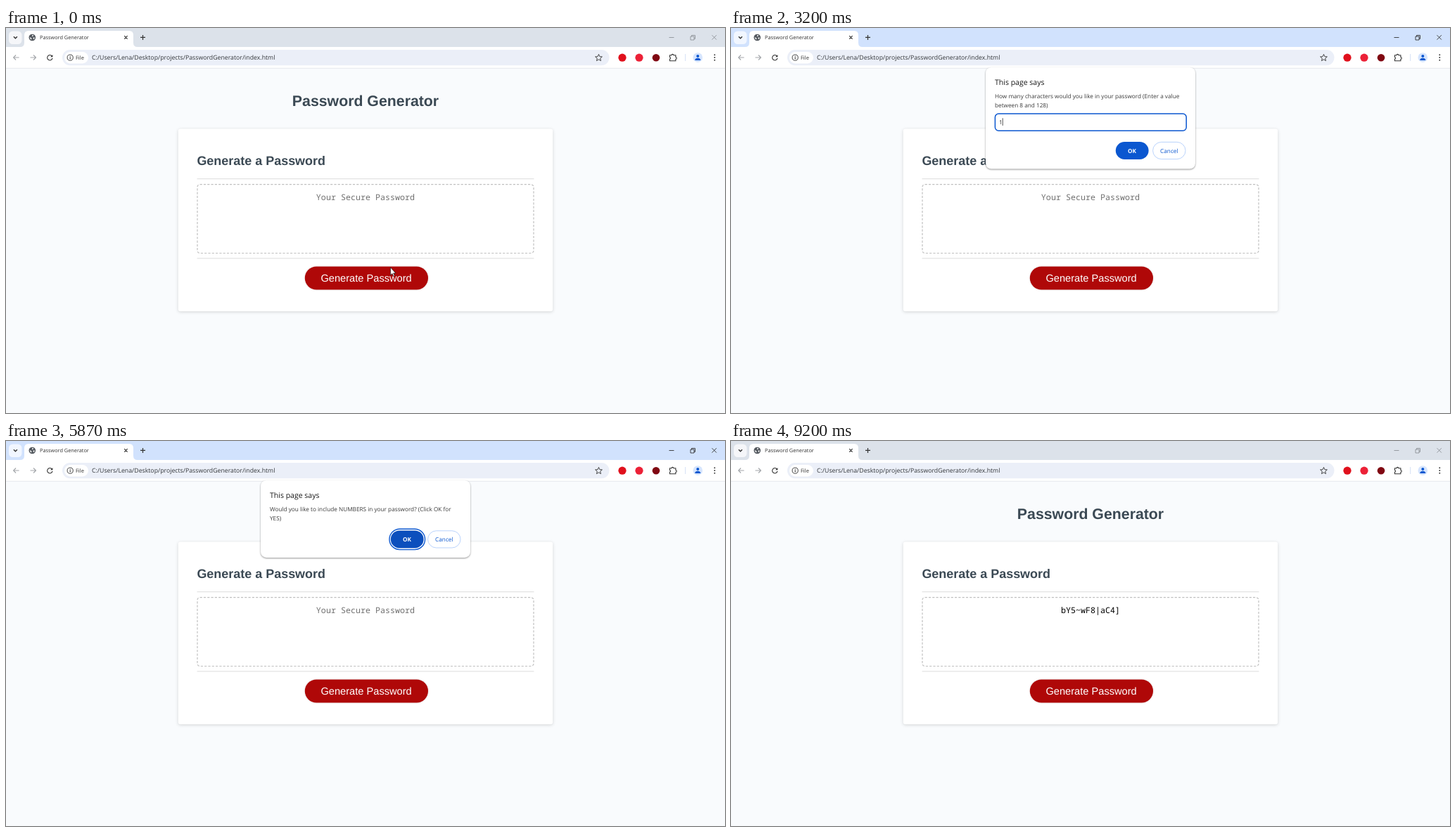
Recreate the animation shown at these times as an HTML page. Size 1022 by 548 pixels, loop 9400 ms.

```html
<!DOCTYPE html>
<html lang="en">
<head>
<meta charset="utf-8">
<title>Password Generator</title>
<style>
html, body { margin: 0; width: 100%; height: 100%; overflow: hidden; background: #f9fbfd; }
svg { display: block; width: 100vw; height: 100vh; }
text { font-family: "Open Sans", "Noto Sans", sans-serif; font-size: 8.22px; fill: #3a3a3a; text-rendering: geometricPrecision; white-space: pre; }
.page { font-family: "Liberation Sans", Arial, sans-serif; font-weight: 700; fill: #3b4954; }
.mono { font-family: "Noto Sans Mono", "DejaVu Sans Mono", monospace; font-size: 11.7px; }
.mid { text-anchor: middle; }
.line { fill: none; stroke: #333; stroke-width: 1.1; }
.card { filter: drop-shadow(0 1.3px 2px rgba(0,0,0,.16)); }
.button { filter: drop-shadow(0 .7px .8px rgba(0,0,0,.15)); }
.panel { filter: drop-shadow(0 1.1px 1.1px rgba(0,0,0,.42)); }
</style>
</head>
<body>
<svg viewBox="0 0 1022 548">
  <rect width="1022" height="548" fill="#f9fbfd"/>

  <!-- Page -->
  <text class="page mid" x="511" y="111" style="font-size:21.3px">Password Generator</text>
  <rect class="card" x="244.8" y="143.5" width="532.4" height="259.8" rx="3.3" fill="#fff"/>
  <text class="page" x="271.4" y="195" style="font-size:17.97px">Generate a Password</text>
  <path d="M271.5 214.7H750.5M271.5 327.9H750.5" stroke="#e3e3e3" stroke-width="1.3"/>
  <rect x="272" y="222.7" width="478" height="97.8" rx="3.6" fill="none" stroke="#c0c0c0" stroke-width="1.2" stroke-dasharray="3.2 2.1"/>
  <text id="field" class="mono mid" x="511" y="244.8"></text>
  <rect class="button" x="424.8" y="339.4" width="175.2" height="33.1" rx="16.5" fill="#af0808"/>
  <text class="page mid" x="512.1" y="360.7" style="font-size:14.64px;font-weight:400;fill:#fff">Generate Password</text>

  <!-- Browser -->
  <rect id="strip" width="1022" height="28"/>
  <rect x="4" y="4.5" width="18.5" height="18.5" rx="5.5" fill="#fff" opacity=".7"/>
  <path class="line" d="M10.9 12.3l2.5 2.5 2.5-2.5" style="stroke-width:1.4"/>
  <path d="M20 27q6 0 6-6V10q0-6 6-6H175q6 0 6 6v11q0 6 6 6z" fill="#fff"/>
  <circle cx="37.3" cy="13.5" r="4.8" fill="#555a60"/>
  <path d="M33.8 13l2.6 1.6-.3 2.1q-2.1-1-2.3-3.7zM37.4 10h1.6l-.4 1.4-1.8.8zM38.6 13.6h2.2l-.7 1.9-1.2.4z" fill="#fff"/>
  <text x="48" y="16.3" style="font-size:7.33px;fill:#333">Password Generator</text>
  <path class="line" d="M168.2 11.2l4.4 4.4m0-4.4l-4.4 4.4M191 13.4h7m-3.5-3.5v7" style="stroke-width:1.2"/>
  <path id="controls" class="line" d="M942.5 13.5h7M973 12h5v5h-5zM974.5 12v-1.6h5v5h-1.5M1003.5 10.2l6.4 6.4m0-6.4l-6.4 6.4" style="stroke-width:.9"/>
  <rect y="27" width="1022" height="30" fill="#fff"/>
  <path d="M0 57.3H1022" stroke="#e2e5e9" stroke-width=".8"/>
  <path class="line" d="M18.6 42h-8m3.5-3.5l-3.5 3.5 3.5 3.5M34.5 42h8m-3.5-3.5l3.5 3.5-3.5 3.5" style="stroke:#a3a6aa"/>
  <path class="line" d="M65.5 40.3a3.7 3.7 0 1 0 .5 2.6"/>
  <path d="M66.4 38v3.2h-3.2z" fill="#333"/>
  <rect x="80" y="31" width="777.5" height="22.2" rx="11.1" fill="#ebeff8"/>
  <rect x="83" y="34" width="34" height="16.4" rx="8.2" fill="#fff"/>
  <circle class="line" cx="91.2" cy="42.1" r="4.1" style="stroke-width:.9"/>
  <path class="line" d="M91.2 41.5v2.8M91.2 39.8v1"/>
  <text x="99" y="45" style="font-size:7.5px;fill:#333">File</text>
  <text x="122" y="45.4" style="font-size:8.74px;fill:#33363a">C:/Users/Lena/Desktop/projects/PasswordGenerator/index.html</text>
  <path class="line" d="M842.5 37.4l1.4 3.2 3.5.3-2.7 2.3.8 3.4-3-1.8-3 1.8.8-3.4-2.7-2.3 3.5-.3z" style="stroke-width:.9"/>
  <circle cx="876" cy="42.2" r="5.6" fill="#e0101c"/>
  <circle cx="900" cy="42.2" r="5.6" fill="#ec2137"/>
  <circle cx="924" cy="42.2" r="5.3" fill="#800712"/>
  <path class="line" d="M943.5 38.8h2.6a1.4 1.4 0 0 1 2.8 0h3v2.7a1.4 1.4 0 0 1 0 2.8v2.5h-8.4v-2.6a1.4 1.4 0 0 0 0-2.7z"/>
  <path d="M965.7 37v10" stroke="#d3e0f5"/>
  <circle cx="983.3" cy="42" r="6.8" fill="#d6e5fd"/>
  <circle cx="983.3" cy="40" r="2" fill="#0b57d0"/>
  <path d="M979.4 46v-1.2q1-2 3.9-2t3.9 2V46z" fill="#0b57d0"/>
  <path d="M1007.3 38.3v.01m0 3.7v.01m0 3.7v.01" stroke="#333" stroke-width="1.9" stroke-linecap="round"/>

  <g id="dialogs"></g>
  <path id="arrow" d="M546.5 340.8v11l2.5-2.2 1.7 3.8 1.7-.8-1.7-3.6h3.3z" fill="#fff" stroke="#111" stroke-width=".7"/>
  <path id="hand" d="M4 .8q1.3 0 1.3 1.3v4l4.9 1q1.6.4 1.4 2l-.6 3.6-.9 2.9H4.9L1 10.5q-.9-1.4.2-1.7.8-.2 1.5.8V2.1Q2.7.8 4 .8z" fill="#fff" stroke="#111" stroke-width=".8"/>
</svg>
<script>
const TICK = 1000 / 15, LOOP = 9400;
const $ = id => document.getElementById(id);

const ask = (what, end) => [`Would you like to include ${what}`, end];
// open and close are ticks; a dialog needs three ticks to settle or vanish
const dialogs = [
  { open: 20, close: 61, prompt: true, lines: ["How many characters would you like in your password (Enter a value", "between 8 and 128)"] },
  { open: 61, close: 77, lines: ask("LOWERCASE characters in password? (Click", "OK for YES)") },
  { open: 77, close: 85.5, lines: ask("UPPERCASE characters in password? (Click", "OK for YES)") },
  { open: 85, close: 93, lines: ask("NUMBERS in your password? (Click OK for", "YES)") },
  { open: 93, close: 102, lines: ask("SPECIAL characters in password? (Click OK", "for YES)") }
];

function dialogMarkup({ prompt, lines }) {
  const y = prompt ? 162 : 127.4;
  const input = `<rect class="focus" x="375.4" y="122" width="271.8" height="24.2" rx="5" fill="#fff" stroke-width="1.5"/>
    <text id="typed" x="381" y="136.8"></text><path id="caret" stroke="#222" stroke-width=".8"/>`;
  const ring = `<rect class="focus" x="545" y="${y - 2.2}" width="50.6" height="29.4" rx="14.7" fill="none" stroke-width="1.4"/>`;
  return `<g>
    <rect class="panel" x="362" y="56" width="298" height="${y - 17.5}" rx="8" fill="#fff"/>
    <text x="375" y="80.9" style="font-size:10.5px;font-weight:500;fill:#151515">This page says</text>
    <text x="375" y="100">${lines[0]}</text><text x="375" y="113.4">${lines[1]}</text>
    ${prompt ? input : ring}
    <rect x="546.8" y="${y}" width="46.8" height="25" rx="12.5" fill="${prompt ? "#0b57d0" : "#0c4fbd"}"/>
    <text class="mid" x="570" y="${y + 15.6}" style="font-weight:700;fill:#fff">OK</text>
    <rect x="599.6" y="${y + .4}" width="46.4" height="24.2" rx="12.1" fill="#fff" stroke="#a8c7fa" stroke-width=".8"/>
    <text class="mid" x="622.8" y="${y + 15.6}" style="font-weight:500;fill:#0b57d0">Cancel</text>
  </g>`;
}

$("dialogs").innerHTML = dialogs.map(dialogMarkup).join("");
dialogs.forEach((d, i) => {
  d.node = $("dialogs").children[i];
  d.focus = d.node.querySelector(".focus");
});

function place(d, tick) {
  const leaving = tick >= d.close;
  let alpha, dy, scale;
  if (leaving) {
    const k = tick - d.close + .3;
    alpha = Math.max(0, 1 - (k / 2.31) ** 2);
    dy = -3.8 * k;
    scale = 1 + .008 * k;
  } else {
    const rest = (1 - Math.min(1, Math.max(0, (tick - d.open) / 3))) ** 1.75;
    alpha = 1 - rest;
    dy = -12.8 * rest;
    scale = 1 + .02 * rest;
  }
  const cy = d.prompt ? 128 : 111;
  d.node.style.display = alpha > 0 ? "" : "none";
  d.node.setAttribute("opacity", alpha);
  d.node.setAttribute("transform", `translate(511 ${cy + dy}) scale(${scale}) translate(-511 ${-cy})`);
  d.focus.setAttribute("stroke", leaving ? (d.prompt ? "#d5d8de" : "none") : "#0b57d0");
}

function draw(tick) {
  const active = tick >= 16 && tick < 138;
  $("strip").setAttribute("fill", active ? "#d1e2fd" : "#dce2ea");
  $("controls").style.stroke = active ? "#333" : "#8e9298";

  const done = tick >= 103;
  $("field").textContent = done ? "bY5~wF8|aC4]" : "Your Secure Password";
  $("field").style.fill = done ? "#000" : "#707070";

  dialogs.forEach(d => place(d, tick));
  const typed = "10".slice(0, Math.max(0, tick - 47));
  const caretOn = tick >= 32 && tick < 40 || tick >= 48 && tick < 57;
  $("typed").textContent = typed;
  $("caret").setAttribute("d", caretOn ? `M${381.5 + 4.7 * typed.length} 128.3v10.6` : "");

  const drift = (tick >= 4) * .5 + (tick >= 6) * .4 + Math.max(0, tick - 14) * 4.3;
  $("arrow").style.display = tick < 1 ? "" : "none";
  $("hand").style.display = tick >= 1 && tick < 20 ? "" : "none";
  $("hand").setAttribute("transform", `translate(535 ${346 + drift})`);
}

function frame() {
  draw(Math.floor((performance.now() % LOOP + 4) / TICK) % 141);
  requestAnimationFrame(frame);
}
frame();
</script>
</body>
</html>
```
